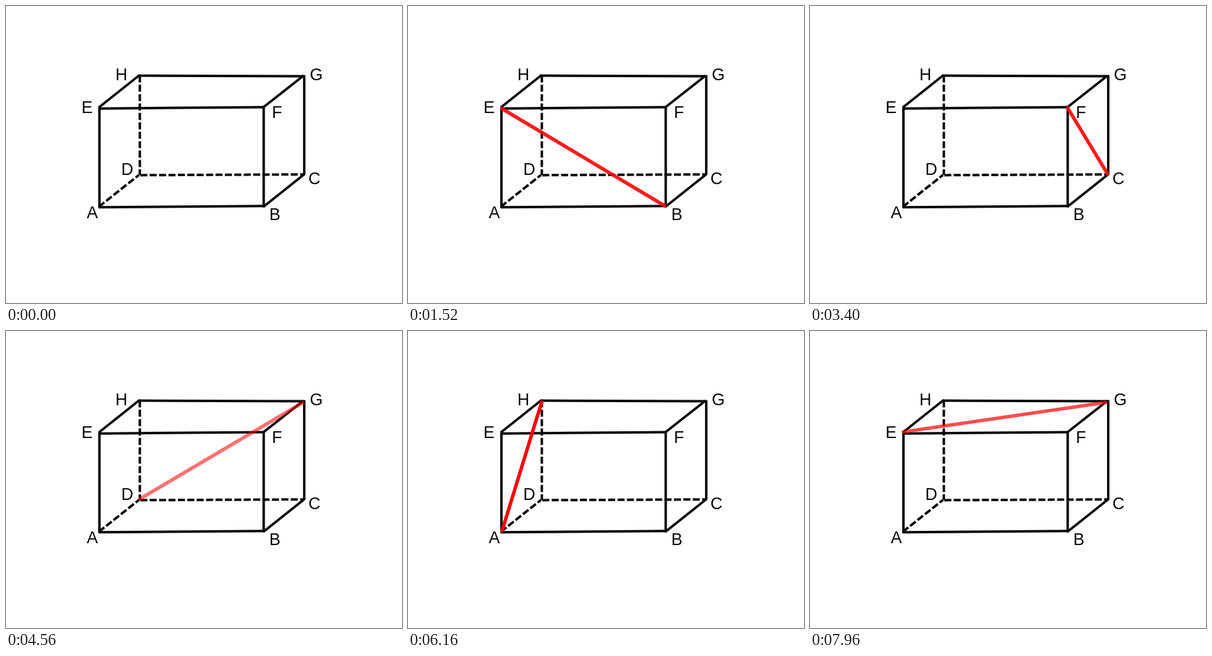
Write an HTML page that moves like this. It is 640 by 480 pixels and loops after 8 s.

```html
<!DOCTYPE html>
<html lang="en">
<head>
<meta charset="utf-8">
<title>Face diagonals of a cuboid</title>
<style>
html, body { margin: 0; width: 100%; height: 100%; overflow: hidden; background: #fff; }
svg { display: block; width: 640px; height: 480px; }
text { font: 27px "Liberation Sans", Arial, sans-serif; text-anchor: middle; fill: #0a0a0a; }
.edges { fill: none; stroke: #0a0a0a; stroke-width: 4; stroke-linejoin: round; }
.hidden { stroke-dasharray: 11.4 3.8; }
.diagonals { stroke: #f00; stroke-width: 5.6; stroke-linecap: round; }

/* Each diagonal fades in by tenths, holds, then fades out; the tiny lead keeps ticks off step borders. */
.diagonals line { opacity: 0; animation: 8s linear -2ms infinite; --in: steps(10, start); --out: steps(9, start); --slow: steps(10, start); }
.diagonals .af { animation-name: af; }
.diagonals .eb { animation-name: eb; }
.diagonals .bg { animation-name: bg; }
.diagonals .cf { animation-name: cf; }
.diagonals .dg { animation-name: dg; }
.diagonals .hc { animation-name: hc; }
.diagonals .ah { animation-name: ah; }
.diagonals .ed { animation-name: ed; }
.diagonals .eg { animation-name: eg; }

@keyframes af {
  0% { opacity: 0; }
  .5% { opacity: 0; animation-timing-function: steps(10, start); }
  5.5% { opacity: 1; }
  7% { opacity: 1; animation-timing-function: steps(10, start); }
  12%, 100% { opacity: 0; }
}
@keyframes eb {
  0% { opacity: 0; }
  12.5% { opacity: 0; animation-timing-function: steps(10, start); }
  17.5% { opacity: 1; }
  19% { opacity: 1; animation-timing-function: steps(9, start); }
  23.5%, 100% { opacity: 0; }
}
@keyframes bg {
  0% { opacity: 0; }
  24% { opacity: 0; animation-timing-function: steps(10, start); }
  29% { opacity: 1; }
  30.5% { opacity: 1; animation-timing-function: steps(10, start); }
  35.5%, 100% { opacity: 0; }
}
@keyframes cf {
  0% { opacity: 0; }
  36% { opacity: 0; animation-timing-function: steps(10, start); }
  41% { opacity: 1; }
  42.5% { opacity: 1; animation-timing-function: steps(10, start); }
  47.5%, 100% { opacity: 0; }
}
@keyframes dg {
  0% { opacity: 0; }
  48% { opacity: 0; animation-timing-function: steps(10, start); }
  53% { opacity: 1; }
  55.5% { opacity: 1; animation-timing-function: steps(9, start); }
  60%, 100% { opacity: 0; }
}
@keyframes hc {
  0% { opacity: 0; }
  60.5% { opacity: 0; animation-timing-function: steps(10, start); }
  65.5% { opacity: 1; }
  67.5% { opacity: 1; animation-timing-function: steps(9, start); }
  72%, 100% { opacity: 0; }
}
@keyframes ah {
  0% { opacity: 0; }
  72.5% { opacity: 0; animation-timing-function: steps(10, start); }
  77.5% { opacity: 1; }
  79.5% { opacity: 1; animation-timing-function: steps(9, start); }
  84%, 100% { opacity: 0; }
}
@keyframes ed {
  0% { opacity: 0; }
  84.5% { opacity: 0; animation-timing-function: steps(10, start); }
  89.5% { opacity: 1; }
  91.5% { opacity: 1; animation-timing-function: steps(9, start); }
  96%, 100% { opacity: 0; }
}
@keyframes eg {
  0% { opacity: 0; }
  96.5% { opacity: 0; animation-timing-function: steps(7, start); }
  100% { opacity: .7; }
}
</style>
</head>
<body>
<svg viewBox="0 0 640 480">
  <g class="edges">
    <path class="hidden" d="M216.3 112V273"/>
    <path class="hidden" d="M217 273.4L482 272.2"/>
    <path class="hidden" d="M150 324.5L215 273"/>
    <path d="M151 164V326"/>
    <path d="M149.5 325.2L417 323.2"/>
    <path d="M151 165.8L416 163.4"/>
    <path d="M416.5 162V325.5"/>
    <path d="M150 164L216 111.5"/>
    <path d="M214.5 112.6L483 113.4"/>
    <path d="M415.5 164L481 112.5"/>
    <path d="M482 112V273"/>
    <path d="M416 324.5L482 272"/>
  </g>
  <g class="diagonals">
    <line class="af" x1="152" y1="324" x2="414.5" y2="165"/>
    <line class="eb" x1="152" y1="166" x2="415" y2="323"/>
    <line class="bg" x1="416.5" y1="323" x2="481" y2="115.5"/>
    <line class="cf" x1="416.5" y1="165" x2="481" y2="271.5"/>
    <line class="dg" x1="217" y1="271" x2="480" y2="115.5"/>
    <line class="hc" x1="216" y1="113" x2="481" y2="271.5"/>
    <line class="ah" x1="152" y1="323" x2="216" y2="115"/>
    <line class="ed" x1="152" y1="166" x2="216" y2="271.5"/>
    <line class="eg" x1="151" y1="163" x2="478" y2="115.5"/>
  </g>
  <text x="139.5" y="343">A</text>
  <text x="434.5" y="346">B</text>
  <text x="498.5" y="288">C</text>
  <text x="196" y="273">D</text>
  <text x="131" y="173">E</text>
  <text x="438" y="181">F</text>
  <text x="501.5" y="120">G</text>
  <text x="186.5" y="120">H</text>
</svg>
</body>
</html>
```
